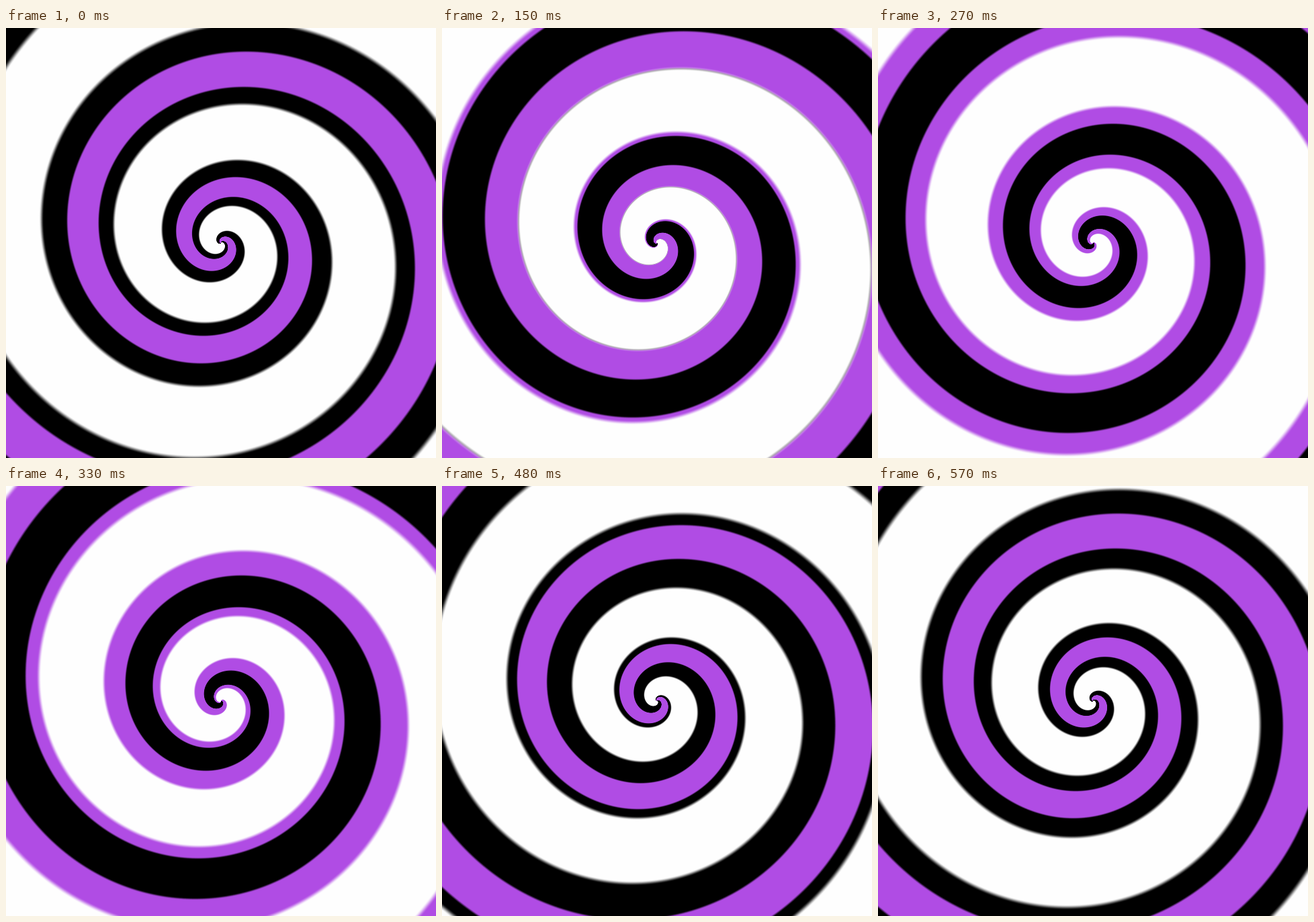
Animation of 640 by 640 pixels, one loop 0.6 s. Source, as an HTML page with a canvas:

```html
<!DOCTYPE html>
<html lang="en">
<head>
<meta charset="utf-8">
<title>Spiral</title>
<style>
  html, body { margin: 0; height: 100%; overflow: hidden; background: #fefefe; }
  canvas { display: block; }
</style>
</head>
<body>
<canvas id="stage" width="640" height="640"></canvas>
<script>
const SIZE = 640, STEPS = 20, STEP_MS = 30, SLOTS = 4096, TAU = 2 * Math.PI;
const PURPLE = [176, 76, 228], WHITE = 254;

const ctx = document.getElementById('stage').getContext('2d');
const image = ctx.createImageData(SIZE, SIZE);
const pixels = new Uint32Array(image.data.buffer);
const twist = new Uint16Array(SIZE * SIZE);
const palette = new Uint32Array(SLOTS);

// Every pixel's angle, twisted by the square root of its radius
for (let i = 0; i < twist.length; i++) {
  const x = i % SIZE + 0.5 - SIZE / 2;
  const y = Math.floor(i / SIZE) + 0.5 - SIZE / 2;
  const turn = 16 * Math.sqrt(Math.hypot(x, y) / (SIZE / 2)) - Math.atan2(y, x);
  twist[i] = Math.round((turn / TAU + 1) * SLOTS) % SLOTS;
}

// Soft-edged band where the wave is positive
function band(angle) {
  const s = Math.min(1, Math.max(0, Math.cos(angle) / 0.2));
  return s * s * (3 - 2 * s);
}

function draw(step) {
  const phase = TAU * (step + 1) / STEPS;
  for (let i = 0; i < SLOTS; i++) {
    const angle = TAU * i / SLOTS;
    const white = band(angle - phase);
    const purple = band(2 * angle - phase);
    const [r, g, b] = PURPLE.map(c => Math.round(c * purple * (1 - white) + WHITE * white));
    palette[i] = (255 << 24 | b << 16 | g << 8 | r) >>> 0;
  }
  for (let i = 0; i < pixels.length; i++) pixels[i] = palette[twist[i]];
  ctx.putImageData(image, 0, 0);
}

let shown = 0;
const start = performance.now();

function tick() {
  const step = Math.floor((performance.now() - start) / STEP_MS) % STEPS;
  if (step !== shown) draw(shown = step);
  requestAnimationFrame(tick);
}

draw(shown);
requestAnimationFrame(tick);
</script>
</body>
</html>
```
